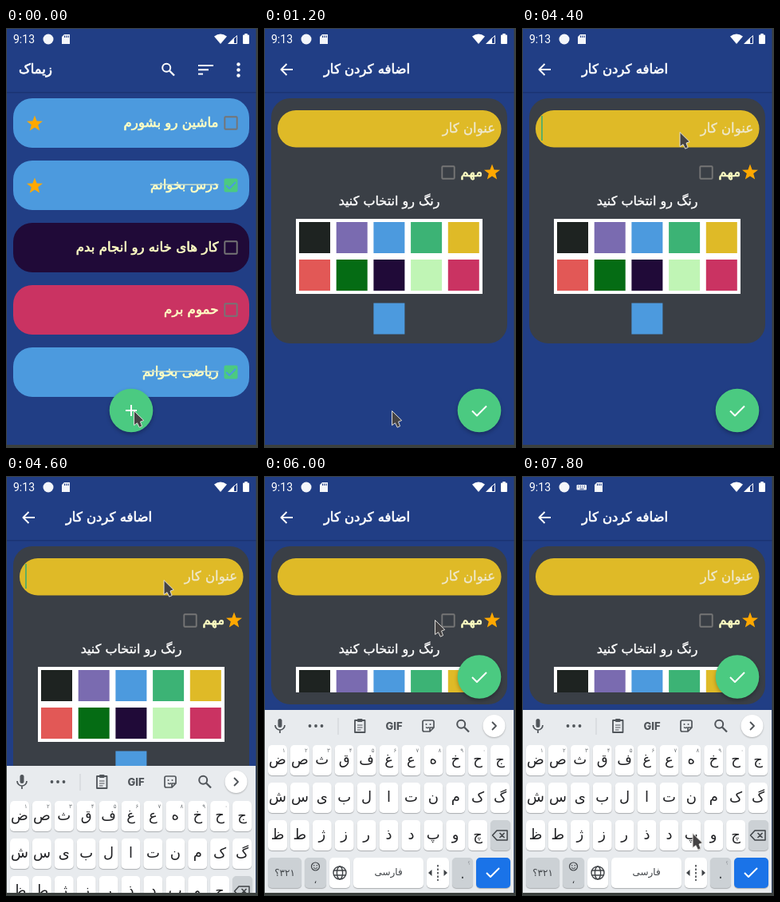
An HTML page with a canvas for the animation above (8 s loop, 316 px wide and 526 px high).

```html
<!DOCTYPE html>
<html lang="fa">
<head>
<meta charset="utf-8">
<title>To-do</title>
<style>
html, body { margin: 0; width: 100%; height: 100%; overflow: hidden; background: #213e85; }
canvas { display: block; width: 316px; height: 526px; }
</style>
</head>
<body>
<canvas id="stage"></canvas>
<script>
const W = 316, H = 526, LOOP = 8000, STEP = 200;
const canvas = document.getElementById('stage');
const ctx = canvas.getContext('2d');
const dpr = window.devicePixelRatio || 1;
canvas.width = W * dpr;
canvas.height = H * dpr;

const C = {
  bg: '#213e85', edge: '#3b403e', blue: '#4c9ade', night: '#200a38', pink: '#ca3362',
  green: '#4bca81', gold: '#dfba27', cream: '#ffffc4', star: '#ffa800', panel: '#3a3f46',
  box: '#757575', key: '#3f4347', keyGray: '#ccd1d5', board: '#e8ebee'
};
const SWATCHES = [
  ['#1e2321', '#7a6bb0', C.blue, '#3cb375', C.gold],
  ['#e25856', '#056c14', C.night, '#c0f5b5', C.pink]
];
const TASKS = [
  { text: 'ماشین رو بشورم', color: C.blue, star: true },
  { text: 'درس بخوانم', color: C.blue, star: true, done: true },
  { text: 'کار های خانه رو انجام بدم', color: C.night },
  { text: 'حموم برم', color: C.pink },
  { text: 'ریاضی بخوانم', color: C.blue, done: true }
];
const ROWS = ['ضصثقفغعهخحج', 'شسیبلاتنمکگ', 'ظطژزرذدپوچ'];
const DIGITS = '۱۲۳۴۵۶۷۸۹۰';

// [time, x, y] of the pointer tip
const POINTER = [
  [0, 160, 479], [2000, 164, 452], [2200, 186, 360], [2400, 212, 240], [2600, 206, 160],
  [2800, 197.5, 130], [6000, 214, 180], [6200, 240, 285], [6400, 256, 400], [6600, 236, 390],
  [6800, 215, 333], [7000, 215, 345], [7200, 232, 395], [7400, 260, 450], [7600, 238, 460],
  [7800, 213.5, 447]
];
const FAB_X = [[0, 157], [800, 174], [1000, 222], [1200, 270]];
const CARET = [[0, 0], [3400, 1], [4000, 0], [4400, 1], [4800, 0], [5400, 1], [6000, 0],
  [6400, 1], [6800, 0], [7400, 1], [7800, 0]];

const at = (table, t) => table.filter(row => row[0] <= t).pop().slice(1);

function rect(x, y, w, h, color, r = 0) {
  ctx.fillStyle = color;
  ctx.beginPath();
  ctx.roundRect(x, y, w, h, r);
  ctx.fill();
}

function disc(x, y, r, color) {
  ctx.fillStyle = color;
  ctx.beginPath();
  ctx.arc(x, y, r, 0, 7);
  ctx.fill();
}

function ring(x, y, r, color, w) {
  ctx.strokeStyle = color;
  ctx.lineWidth = w;
  ctx.beginPath();
  ctx.arc(x, y, r, 0, 7);
  ctx.stroke();
}

function fillPath(d, color) {
  ctx.fillStyle = color;
  ctx.fill(new Path2D(d));
}

function strokePath(d, color, w = 2) {
  ctx.strokeStyle = color;
  ctx.lineWidth = w;
  ctx.stroke(new Path2D(d));
}

function text(str, x, y, size, color, { weight = 400, align = 'center', font = 'DejaVu Sans', dir = 'rtl' } = {}) {
  ctx.font = `${weight} ${size}px "${font}", sans-serif`;
  ctx.direction = dir;
  ctx.textAlign = align;
  ctx.fillStyle = color;
  ctx.fillText(str, x, y);
  return ctx.measureText(str).width;
}

// Medium weight: regular letters thickened by a thin outline
function label(str, x, y, size, color, align = 'right', heft = 0.7) {
  const w = text(str, x, y, size, color, { align });
  ctx.strokeStyle = color;
  ctx.lineWidth = heft;
  ctx.lineJoin = 'round';
  ctx.strokeText(str, x, y);
  return w;
}

function shadowed(blur, dy, color, draw) {
  ctx.save();
  ctx.shadowColor = color;
  ctx.shadowBlur = blur * dpr;
  ctx.shadowOffsetY = dy * dpr;
  draw();
  ctx.restore();
}

function star(x, y, r) {
  ctx.fillStyle = C.star;
  ctx.beginPath();
  for (let i = 0; i < 10; i++) {
    const a = i * Math.PI / 5 - Math.PI / 2, q = i % 2 ? r * 0.42 : r;
    ctx.lineTo(x + q * Math.cos(a), y + 1 + q * Math.sin(a));
  }
  ctx.fill();
}

function checkbox(x, y, tick) {
  if (tick) {
    rect(x - 8.5, y - 8.5, 17, 17, C.green, 2);
    strokePath(`M${x - 6} ${y}l4 4 8-8`, tick);
  } else {
    ctx.strokeStyle = C.box;
    ctx.lineWidth = 1.9;
    ctx.beginPath();
    ctx.roundRect(x - 7.7, y - 7.7, 15.4, 15.4, 1);
    ctx.stroke();
  }
}

function magnifier(x, y, color) {
  ring(x - 2.3, y - 2.3, 5, color, 2);
  strokePath(`M${x + 1.5} ${y + 1.5}l6 6`, color, 2.3);
}

function statusBar(withKeyboardIcon) {
  text('9:13', 9, 19, 14, '#fff', { align: 'left', font: 'Roboto', dir: 'ltr' });
  disc(53, 14, 6.5, '#f4f6fa');
  let sd = 75;
  if (withKeyboardIcon) {
    rect(68.5, 11, 12.5, 6.5, '#f4f6fa', 1);
    for (let i = 0; i < 8; i++) rect(70.5 + i % 4 * 2.5, 12 + (i >> 2) * 1.8, 1, 1, C.bg);
    rect(72.5, 15.7, 5, 0.9, C.bg);
    sd = 96;
  }
  fillPath(`M${sd - 2} 8h7v12h-10v-9z`, '#f4f6fa');
  for (let i = 0; i < 3; i++) rect(sd - 2 + i * 2.3, 9.5, 1.1, 2.5, C.bg);
  fillPath('M261 10.5Q269 4.5 277 10.5L269 20z', '#fff');
  strokePath('M289.500 9.500V19.500H279.500z', '#fff', 1);
  fillPath('M286 12V20H278z', '#fff');
  rect(297, 8.5, 8, 11.5, '#fff', 1);
  rect(299.3, 7, 3.4, 2, '#fff');
}

function listPage() {
  label('زیماک', 16, 57, 16.5, '#fff', 'left');
  magnifier(203.5, 52, '#fff');
  [19, 13, 6].forEach((w, i) => rect(241, 46 + i * 5.3, w, 2, '#fff'));
  [45.5, 52.5, 59.5].forEach(y => disc(291.5, y, 2.2, '#fff'));
  TASKS.forEach((task, i) => {
    const y = 88 + i * 78, mid = y + 31;
    rect(9, y, 296, 62, task.color, 24);
    const w = label(task.text, 266.5, mid + 5, 16.7, C.cream);
    if (task.done) rect(266.5 - w, mid - 1.5, w, 1.3, '#e4edc8');
    if (task.star) star(36, mid, 10.5);
    checkbox(282, mid, task.done && task.color);
  });
}

function formPage(short, caret) {
  strokePath('M36 52H22M28.5 45l-7 7 7 7', '#fff', 1.9);
  label('اضافه کردن کار', 183, 57, 16.5, '#fff');
  rect(9, 88, 296, short ? 198 : 307, C.panel, 24);
  rect(17, 103, 280.5, 46.5, C.gold, 23);
  label('عنوان کار', 290, 131, 16.5, '#eee8cd', 'right', 0.4);
  if (caret) rect(24, 110, 2, 31, '#5fae62');
  star(286, 180, 10.5);
  label('مهم', 274, 186, 16.5, C.cream);
  checkbox(231, 181);
  label('رنگ رو انتخاب کنید', 220.5, 222, 16, '#fff', 'right', 0.4);
  ctx.save();
  ctx.beginPath();
  ctx.rect(9, 230, 296, short ? 41 : 160);
  ctx.clip();
  rect(40, 239, 234, 94, '#fff');
  SWATCHES.forEach((row, j) => row.forEach((color, i) =>
    rect(44 + i * 46.7, 243 + j * 47, 39, 39, color)));
  rect(137.4, 344.5, 39, 39, C.blue);
  ctx.restore();
}

function fab(x, y, tick, pressed) {
  shadowed(5, 2.5, 'rgba(0,0,0,.28)', () => disc(x, y, 27.3, C.green));
  if (pressed) disc(x, y, 27.3, 'rgba(255,255,255,.16)');
  strokePath(tick ? `M${x - 9} ${y + .5}l6 6 12-12` : `M${x - 7} ${y}h14M${x} ${y - 7}v14`, '#fff');
}

function keyCap(x, y, w, color = '#fff') {
  shadowed(1, 1, 'rgba(60,64,67,.35)', () => rect(x, y, w, 38, color, 5));
}

function toolbar() {
  const ink = '#50555a';
  rect(17.5, 304, 5, 11, ink, 2.5);
  strokePath('M14 312a6 6 0 0 0 12 0M20 318v4', ink, 1.7);
  [57.5, 65, 72.5].forEach(x => disc(x, 313, 1.9, ink));
  rect(92.5, 303, 1, 21, '#ccd0d4');
  strokePath('M114 306h12.500v15h-12.500z', ink, 1.8);
  rect(117, 304, 6.5, 4, ink, 1);
  strokePath('M117 312h6.500M117 315h6.500M117 318h4.500', ink, 1.2);
  text('GIF', 163, 317.5, 13, ink, { weight: 800, font: 'Inter', dir: 'ltr' });
  strokePath('M201 306h10q2 0 2 2v7l-5 5h-7q-2 0-2-2v-10q0-2 2-2M213 315h-5v5', ink, 1.7);
  disc(203.5, 311, 1, ink);
  disc(208.5, 311, 1, ink);
  strokePath('M203 314.500q2 2 4 0', ink, 1.3);
  magnifier(249.5, 313, ink);
  shadowed(2, 1, 'rgba(0,0,0,.25)', () => disc(288.5, 313, 14, '#fff'));
  strokePath('M286 308l5 5-5 5', ink, 1.8);
}

function bottomRow() {
  const y = 478, mid = 497;
  keyCap(5, y, 42, C.keyGray);
  text('۳۲۱؟', 26, mid + 4, 12, C.key);
  keyCap(51, y, 27, C.keyGray);
  ring(64.5, 489, 5, C.key, 1.2);
  disc(62.7, 487.7, .8, C.key);
  disc(66.3, 487.7, .8, C.key);
  strokePath('M62 490.500q2.500 2.500 5 0', C.key, 1);
  text('،', 64.5, 510, 12, C.key);
  keyCap(82, y, 26);
  ring(95, mid, 8, C.key, 1.4);
  ctx.beginPath();
  ctx.ellipse(95, mid, 3.6, 8, 0, 0, 7);
  ctx.stroke();
  strokePath('M87.500 494h15M87.500 500h15', C.key, 1.3);
  keyCap(112, y, 88);
  text('فارسی', 156, mid + 3, 12, C.key);
  keyCap(204, y, 28);
  fillPath('M206 497l4.500-4v8zM230 497l-4.500-4v8z', C.key);
  ctx.setLineDash([2.5, 2]);
  strokePath('M218 487v20', C.key, 1.6);
  ctx.setLineDash([]);
  keyCap(236, y, 26, C.keyGray);
  text('.', 249, mid + 7, 17, C.key);
  text('؟', 257, 487, 6, '#858a8f');
  keyCap(266, y, 43, '#1a73e8');
  strokePath('M279 497l5 5 11-11', '#fff');
}

function keyboard(offset) {
  ctx.save();
  ctx.beginPath();
  ctx.rect(1, 82, 312, 440);
  ctx.clip();
  ctx.translate(0, offset);
  rect(1, 293, 312, 230, C.board);
  toolbar();
  ROWS.forEach((row, j) => [...row].forEach((ch, i) => {
    const x = 17 + i * 27.9, y = 337 + j * 47;
    keyCap(x - 12, y, 24);
    text(ch, x, y + 24, 18, '#202124');
    if (!j && DIGITS[i]) text(DIGITS[i], x + 8, y + 9, 7, '#6d7276');
  }));
  keyCap(284, 431, 25, C.keyGray);
  strokePath('M292 444h13v12h-13l-5.500-6zM295.500 447l6 6M301.500 447l-6 6', C.key, 1.5);
  bottomRow();
  ctx.restore();
}

function pointer(x, y) {
  ctx.save();
  ctx.translate(x, y);
  ctx.scale(1.06, 1.06);
  const d = 'M.5.5V17.500L4.300 14.800 6.800 20 10 18.500 8 13.300 12 11.800z';
  fillPath(d, '#454344');
  ctx.lineJoin = 'round';
  strokePath(d, '#e6e4e0', 0.9);
  ctx.restore();
}

function render(t) {
  const form = t >= 1200, typing = t >= 4800;
  ctx.setTransform(dpr, 0, 0, dpr, 0, 0);
  rect(0, 0, W, H, C.edge);
  rect(1, 1, 312.5, 521, C.bg);
  rect(1, 80, 312.5, 1.5, 'rgba(10,20,60,.25)');
  statusBar(t >= 6200);
  if (form) formPage(typing, at(CARET, t)[0]);
  else listPage();
  fab(at(FAB_X, t)[0], typing ? 251.5 : 479, form, t >= 600 && t < 1000);
  if (t >= 4600) keyboard(typing ? 0 : 70);
  pointer(...at(POINTER, t));
}

function tick() {
  const t = performance.now() % LOOP;
  render(Math.floor(t / STEP) * STEP);
  requestAnimationFrame(tick);
}
tick();
</script>
</body>
</html>
```
